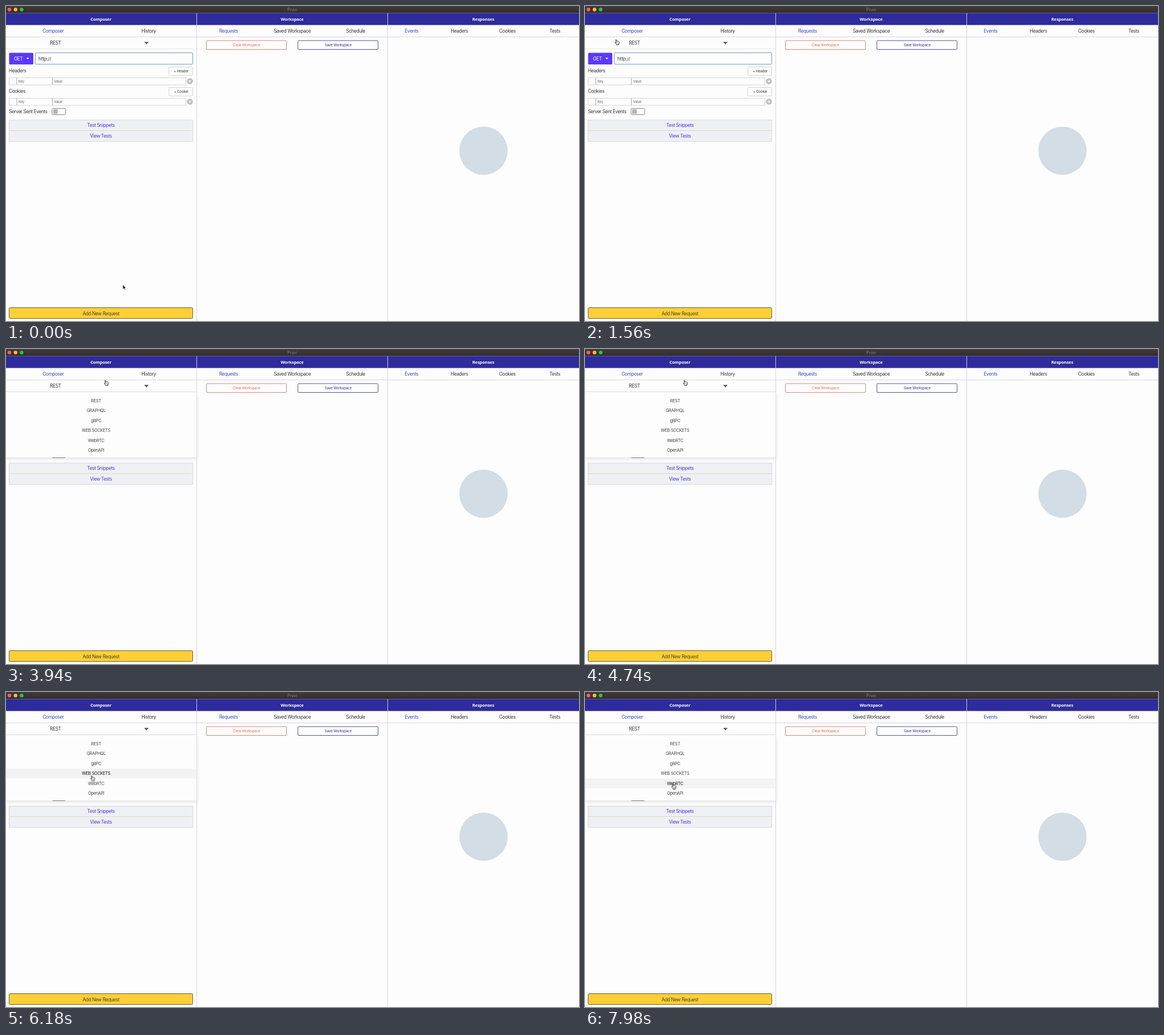
These frames come from a looping animation (1008 by 555 pixels, 8000 ms). An HTML page:

```html
<!DOCTYPE html>
<html lang="en">
<head>
<meta charset="utf-8">
<title>API client</title>
<style>
html, body { margin: 0; width: 100%; height: 100%; overflow: hidden; background: #fdfdfd; }
svg { display: block; width: 1008px; height: 555px; }
text { font: 8.3px Inter, Roboto, sans-serif; letter-spacing: -.38px; fill: #363636; white-space: pre; }
.mid text, text.mid { text-anchor: middle; }
.head text { font: 700 7.5px "Noto Sans", "Open Sans", sans-serif; letter-spacing: -.08px; fill: #fff; }
.small text { font-size: 6.3px; letter-spacing: -.2px; }
.field text { font-size: 6px; letter-spacing: -.2px; fill: #666; }
.menu text { font-size: 7.35px; letter-spacing: -.28px; fill: currentColor; }
.menu g { color: #404040; }
text.on { fill: #3c4cc0; }
text.violet { fill: #5433e8; }
.line { fill: none; stroke: #d6d6de; }
.box { fill: #fdfdfd; stroke: #d4d4d4; }

.menu, .band, .cursor, .arrow, .hand, .menu g text { animation: 8s step-end infinite; }
.menu { animation-name: open; }
.panel { filter: drop-shadow(0 2px 3px rgba(10, 10, 10, .13)); }
.band { animation-name: band; }
.menu .i0 { animation-name: hot0; }
.menu .i1 { animation-name: hot1; }
.menu .i2 { animation-name: hot2; }
.menu .i3 { animation-name: hot3; }
.menu .i4 { animation-name: hot4; }
.cursor { animation-name: move; animation-timing-function: ease-in-out; }
.arrow { animation-name: arrow; }
.hand { animation-name: hand; }

@keyframes open { 0% { visibility: hidden; } 45% { visibility: visible; } }
@keyframes band {
  0% { opacity: 0; transform: none; }
  64.5% { opacity: 1; transform: none; }
  67.3% { opacity: 1; transform: translateY(17.5px); }
  71% { opacity: 1; transform: translateY(35px); }
  74.5% { opacity: 1; transform: translateY(52.5px); }
  88%, 100% { opacity: 1; transform: translateY(70px); }
}
@keyframes hot0 { 64.5% { fill: #0a0a0a; } 67.3% { fill: currentColor; } }
@keyframes hot1 { 67.3% { fill: #0a0a0a; } 71% { fill: currentColor; } }
@keyframes hot2 { 71% { fill: #0a0a0a; } 74.5% { fill: currentColor; } }
@keyframes hot3 { 74.5% { fill: #0a0a0a; } 88% { fill: currentColor; } }
@keyframes hot4 { 88%, 100% { fill: #0a0a0a; } }
@keyframes arrow { 0% { visibility: visible; } 15.6%, 100% { visibility: hidden; } }
@keyframes hand { 0% { visibility: hidden; } 15.6%, 100% { visibility: visible; } }
@keyframes move {
  0%, 2.5% { transform: translate(205.5px, 491px); }
  17.5%, 21% { transform: translate(55px, 59px); }
  34%, 60% { transform: translate(175px, 55px); animation-timing-function: linear; }
  66.75% { transform: translate(139px, 107.5px); animation-timing-function: linear; }
  76%, 85% { transform: translate(151px, 147.5px); }
  91%, 100% { transform: translate(154.5px, 161.5px); }
}
</style>
</head>
<body>
<svg viewBox="0 0 1008 555">
  <defs>
    <linearGradient id="bar" x2="0" y2="1">
      <stop stop-color="#423b3c"/><stop offset="1" stop-color="#322c2d"/>
    </linearGradient>
    <g id="row">
      <rect class="box" x="5.5" y=".5" width="311" height="12.5"/>
      <path d="M19 .5V13M81.5 .5V13" stroke="#a8a8a8"/>
      <circle cx="323.5" cy="6.5" r="5.2" fill="#bdbdbd"/>
      <path d="M321.6 4.6l3.8 3.8m0-3.8l-3.8 3.8" stroke="#fff" stroke-width="1.1"/>
      <g class="field"><text x="22" y="9">Key</text><text x="84.5" y="9">Value</text></g>
    </g>
  </defs>

  <rect width="1008" height="555" fill="#fdfdfd"/>
  <rect width="1008" height="12.5" fill="url(#bar)"/>
  <circle cx="6" cy="6.3" r="3.2" fill="#fe5f57"/>
  <circle cx="16.8" cy="6.3" r="3.2" fill="#febc2e"/>
  <circle cx="27.5" cy="6.3" r="3.2" fill="#28c840"/>
  <text class="mid" x="503.5" y="9" style="font-size:7px;letter-spacing:0;fill:#8d8788">Pruvi</text>

  <rect y="12.5" width="1008" height="21" fill="#2e2b9c"/>
  <g class="head mid">
    <text x="167" y="25.7">Composer</text>
    <text x="503.5" y="25.7">Workspace</text>
    <text x="839.5" y="25.7">Responses</text>
  </g>
  <path d="M335.5 12.5v21M671.5 12.5v21" stroke="#c9c9e6"/>
  <path class="line" d="M335.5 33.5V555M671.5 33.5V555M0 54.5H1008"/>
  <path class="line" d="M0 75.5H335" style="stroke:#e6e6de"/>

  <g class="mid">
    <text class="on" x="83" y="47">Composer</text>
    <text x="251" y="47">History</text>
    <text class="on" x="391.5" y="47">Requests</text>
    <text x="503.5" y="47">Saved Workspace</text>
    <text x="615" y="47">Schedule</text>
    <text class="on" x="713.5" y="47">Events</text>
    <text x="797.5" y="47">Headers</text>
    <text x="882" y="47">Cookies</text>
    <text x="965.5" y="47">Tests</text>
    <text x="87" y="68">REST</text>
  </g>
  <path d="M243 63.2h8l-4 4.3z" fill="#555"/>

  <rect x="5.5" y="82.5" width="42.5" height="20.5" rx="1.5" fill="#5b38fb"/>
  <text x="14" y="95.8" style="fill:#fff">GET</text>
  <path d="M35.6 91.2h5.4l-2.7 2.9z" fill="#fff"/>
  <rect x="51.5" y="82.5" width="277" height="20" rx="1.5" fill="#fdfdfd" stroke="#6ba0c4"/>
  <text x="57" y="95.8" style="letter-spacing:-.2px">http://</text>

  <text x="5" y="117">Headers</text>
  <text x="5" y="153">Cookies</text>
  <text x="5" y="189">Server Sent Events</text>
  <rect class="box" x="286.5" y="107.5" width="42" height="15" rx="1"/>
  <rect class="box" x="286.5" y="143.5" width="42" height="15" rx="1"/>
  <g class="small mid">
    <text x="308" y="117.4">+ Header</text>
    <text x="308" y="153.4">+ Cookie</text>
    <rect x="352.5" y="61" width="141" height="15.5" rx="1.5" fill="#fdfdfd" stroke="#e08474"/>
    <text x="423" y="71" style="fill:#d9705e">Clear Workspace</text>
    <rect x="513.5" y="61" width="141" height="15.5" rx="1.5" fill="#fdfdfd" stroke="#56549f"/>
    <text x="584.3" y="71" style="fill:#35338c">Save Workspace</text>
  </g>
  <use href="#row" y="126"/>
  <use href="#row" y="162"/>
  <rect x="81" y="180.5" width="24" height="11" rx="1.5" fill="#fdfdfd" stroke="#858585"/>
  <rect x="83" y="182" width="8" height="8" rx="1" fill="#b3b3b3"/>

  <rect x="5.5" y="201" width="323" height="37.5" fill="#eff0f3" stroke="#d5d6e2"/>
  <path d="M5.5 219.5h323" stroke="#d9d7c8"/>
  <g class="mid">
    <text class="violet" x="167" y="213.4">Test Snippets</text>
    <text class="violet" x="167" y="232.4">View Tests</text>
    <rect x="5.5" y="531.5" width="323" height="19" rx="1.8" fill="#fdcf36" stroke="#6a5c3a"/>
    <text x="167" y="544.7" style="fill:#4d4326">Add New Request</text>
  </g>

  <circle cx="840" cy="255" r="42.5" fill="#d2dde6"/>

  <g class="menu mid">
    <rect class="panel" y="76" width="335.5" height="115" fill="#fdfdfd"/>
    <rect class="band" y="82.2" width="335" height="17.5" fill="#f3f3f3"/>
    <g>
      <text class="i0" x="158.5" y="93.7">REST</text>
      <text class="i1" x="158.5" y="111.2">GRAPHQL</text>
      <text class="i2" x="158.5" y="128.7">gRPC</text>
      <text class="i3" x="158.5" y="146.2">WEB SOCKETS</text>
      <text class="i4" x="158.5" y="163.7">WebRTC</text>
      <text x="158.5" y="181.2">OpenAPI</text>
    </g>
  </g>

  <g class="cursor" stroke-linejoin="round">
    <path class="arrow" d="M0 0V8.2L1.9 6.5 3.1 9.3 4.5 8.7 3.3 6H5.8z" fill="#111" stroke="#fff" stroke-width=".7"/>
    <path class="hand" d="M-1.1 .6Q-.5-.6.2.6L1 3.2 2.2 2.8 3.3 3.1 4.4 3.3 5.2 4.2V6.6L4.3 8V9.3H.2V8.4L-1.9 6.2Q-2.4 5-1.2 5.1L-.1 5.6Z" fill="#fff" stroke="#222" stroke-width=".9"/>
    <path class="hand" d="M1.2 5.6V7.4M2.4 5.6V7.4M3.6 5.6V7.4" stroke="#333" stroke-width=".5"/>
  </g>
</svg>
</body>
</html>
```
